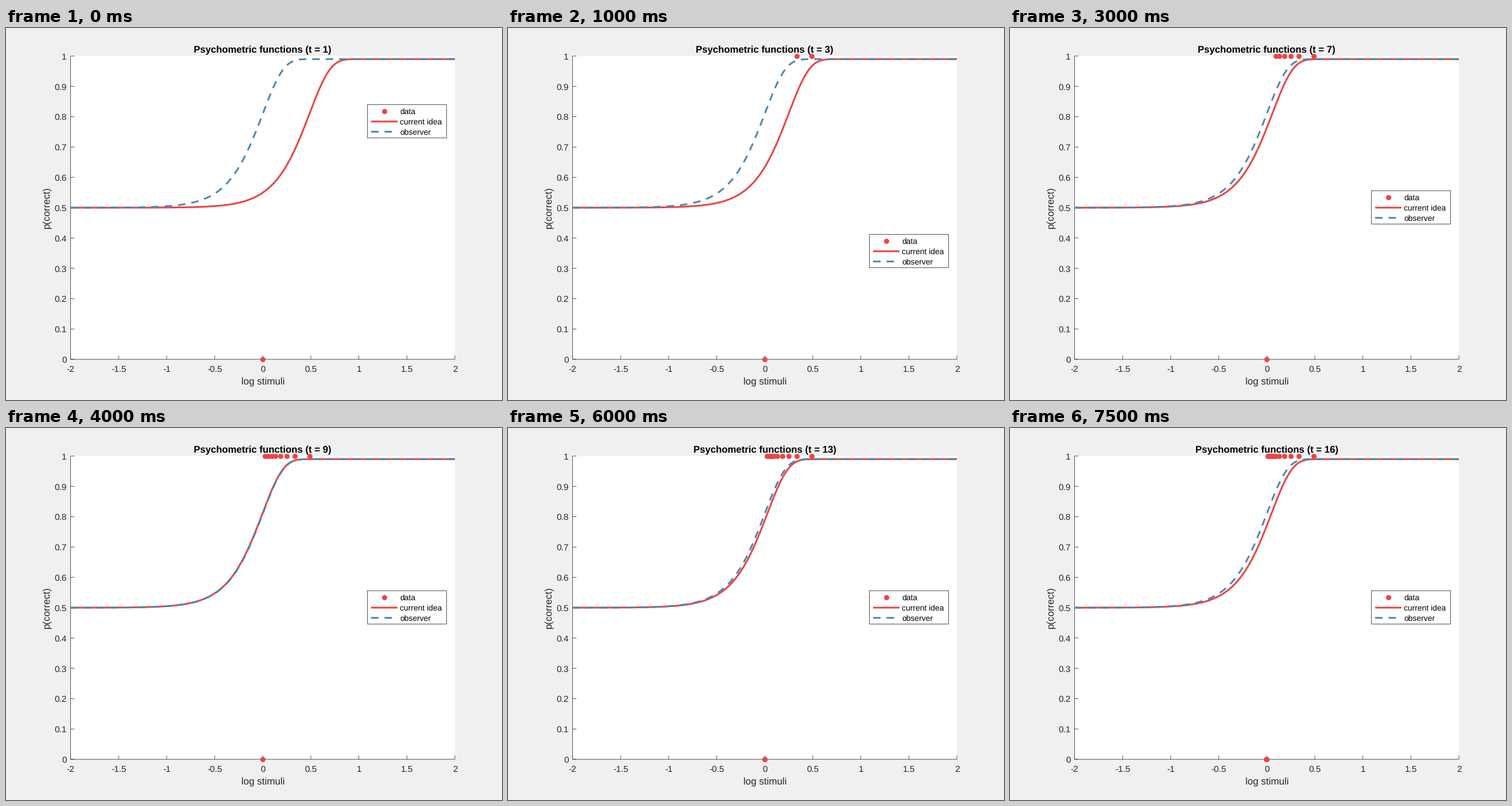
A matplotlib script that plays this animation: 864 px wide and 648 px high, repeating every 8 s.

```python
import numpy as np
import matplotlib.pyplot as plt
from matplotlib.animation import FuncAnimation
from matplotlib.patches import Rectangle

plt.rcParams["font.family"] = "Liberation Sans"
plt.rcParams["text.hinting"] = "none"
plt.rcParams["path.snap"] = False

W, H = 864, 648
LEFT, RIGHT, TOP, BOTTOM = 112.5, 782.0, 48.9, 577.1
RED, BLUE, INK = "#ec4444", "#4f87b4", "#262626"
LW, THIN = 3.09, 0.8
TICK_SIZE, LABEL_SIZE, TITLE_SIZE, KEY_SIZE = 15.43, 16.97, 16.8, 13.89
DASH = (0, (13 / LW, 10.4 / LW))

# Threshold estimate after each trial; it is also the next stimulus level.
THETA = [0.486, 0.335, 0.248, 0.182, 0.132, 0.095, 0.057, 0.020,
         -0.004, 0.081, 0.062, 0.045, 0.026, 0.008, -0.009, 0.048]
STIMULI = np.array([0.0] + THETA[:-1])
CORRECT = np.ones(len(THETA))
CORRECT[[0, 9, 15]] = 0


def px(x):
    return LEFT + (np.asarray(x) + 2) / 4 * (RIGHT - LEFT)


def py(p):
    return BOTTOM - np.asarray(p) * (BOTTOM - TOP)


def weibull(x, theta):
    return 0.5 + 0.49 * (1 - np.exp(-10 ** (2 * (x - theta))))


# 72 dpi makes one point equal one pixel.
fig = plt.figure(figsize=(W / 72, H / 72), dpi=72, facecolor="#f0f0f0")
ax = fig.add_axes([0, 0, 1, 1])
ax.set_xlim(0, W)
ax.set_ylim(H, 0)
ax.axis("off")


def line(x, y, color=INK, width=THIN, z=2, **kw):
    return ax.plot(x, y, color=color, lw=width, zorder=z,
                   solid_capstyle="butt", dash_capstyle="butt", **kw)[0]


def dots(z):
    return ax.plot([], [], "o", color=RED, ms=9, mew=0, zorder=z,
                   snap=False)[0]


def label(x, y, s, size, color=INK, **kw):
    return ax.text(x, y, s, fontsize=size, color=color, va="baseline",
                   zorder=4, **kw)


ax.add_patch(Rectangle((LEFT, TOP), RIGHT - LEFT, BOTTOM - TOP,
                       fc="white", ec="none", zorder=1))
line([LEFT, RIGHT], [BOTTOM, BOTTOM])
line([LEFT, LEFT], [TOP, BOTTOM])
for v in np.linspace(-2, 2, 9):
    line([px(v)] * 2, [BOTTOM, BOTTOM - 6.7])
    label(px(v), 598.6, f"{v:g}", TICK_SIZE, ha="center")
for v in np.linspace(0, 1, 11):
    line([LEFT, LEFT + 6.7], [py(v)] * 2)
    label(105.6, py(v) + 5.8, f"{v:g}", TICK_SIZE, ha="right")
label(447.5, 620, "log stimuli", LABEL_SIZE, ha="center")
label(75.6, 312.4, "p(correct)", LABEL_SIZE, ha="center", rotation=90,
      rotation_mode="anchor")
title = label(447.3, 42.3, "", TITLE_SIZE, "black", ha="center",
              weight="bold")

xs = np.linspace(-2, 2, 401)
data = dots(5)
idea = line(px(xs), py(weibull(xs, 0)), RED, LW, 6)
line(px(xs), py(weibull(xs, 0)), BLUE, LW, 7, ls=DASH)

box = Rectangle((629.5, 0), 138, 58, fc="white", ec=INK, lw=THIN, zorder=3)
ax.add_patch(box)
key_dot = dots(4)
key_idea = line([636, 682], [0, 0], RED, LW, 4)
key_obs = line([636, 682], [0, 0], BLUE, LW, 4, ls=DASH)
names = [label(686.3, 0, s, KEY_SIZE, "black")
         for s in ("data", "current idea", "observer")]


def place_legend(y):
    rows = y + np.array([11.8, 29.4, 47.2])
    box.set_y(y)
    key_dot.set_data([658.5], [rows[0]])
    key_idea.set_ydata([rows[1]] * 2)
    key_obs.set_ydata([rows[2]] * 2)
    for text, row in zip(names, rows):
        text.set_y(row + 4.9)


def update(i):
    t = i + 1
    title.set_text(f"Psychometric functions (t = {t})")
    data.set_data(px(STIMULI[:t]), py(CORRECT[:t]))
    idea.set_ydata(py(weibull(xs, THETA[i])))
    place_legend(133.5 if t == 1 else 359.5 if t < 6 else 283.5)
    return title, data, idea


anim = FuncAnimation(fig, update, frames=len(THETA), interval=500,
                     init_func=lambda: update(0), repeat=True, repeat_delay=0)
plt.show()
```
